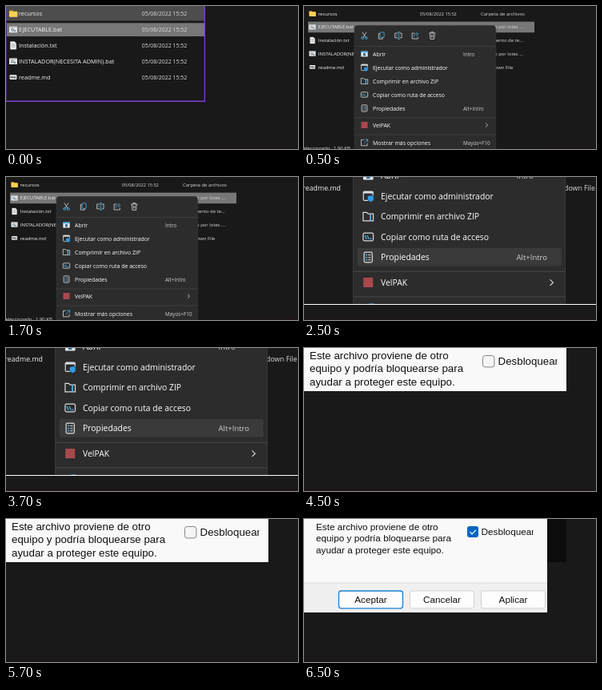
Write an HTML page that moves like this. It is 365 px wide and 179 px high and loops after 8000 ms.

```html
<!DOCTYPE html>
<html lang="es">
<head>
<meta charset="utf-8">
<title>Desbloquear archivo</title>
<style>
html, body { margin: 0; width: 100%; height: 100%; overflow: hidden; background: #191919; }
svg { display: block; width: 100vw; height: 100vh; }
text { font-family: "Open Sans", "Noto Sans", sans-serif; white-space: pre; }
.dialog text { font-family: "Liberation Sans", Arial, sans-serif; }
</style>
</head>
<body>
<svg id="stage" viewBox="0 0 365 179"></svg>
<script>
const LOOP = 8000;
const STARTS = [0, 500, 2500, 4500, 6500];

const rect = (x, y, w, h, fill, extra = '') =>
  `<rect x="${x}" y="${y}" width="${w}" height="${h}" fill="${fill}" ${extra}/>`;
const line = (d, stroke, width = 0.8, fill = 'none') =>
  `<path d="${d}" stroke="${stroke}" stroke-width="${width}" fill="${fill}"/>`;
const text = (x, y, size, str, fill = '#f2f2f2', extra = '') =>
  `<text x="${x}" y="${y}" font-size="${size}" fill="${fill}" ${extra}>${str}</text>`;
const at = (x, y, body, scale = 1) =>
  `<g transform="translate(${x} ${y}) scale(${scale})">${body}</g>`;

// Icons are centred on 0,0.
const fileIcons = {
  folder: rect(-5, -4, 5, 4, '#e0a020', 'rx=".8"') + rect(-5, -2.8, 10.4, 7, '#ffcf55', 'rx=".8"'),
  bat: rect(-5, -3.8, 10, 7.6, '#e8eaec', 'rx=".6"') + rect(-5, -3.8, 10, 1.4, '#b9c0c6') +
    '<circle cx="-1" cy=".2" r="1.5" fill="none" stroke="#66737d"/>' +
    '<circle cx="2" cy="1.6" r="1" fill="none" stroke="#66737d" stroke-width=".8"/>',
  txt: line('M-3.6-4.8H1.6L3.8-2.6V4.8H-3.6Z', '#b8b8b8', 0.5, '#f4f4f4') +
    line('M-2.2-1.8H2.4M-2.2 0H2.4M-2.2 1.8H2.4', '#85909a', 0.7),
  md: rect(-4.4, -2.9, 8.8, 5.8, '#f0f0f0', 'rx="1"') +
    line('M-2.8 1.4V-1.2L-1.5.3-.2-1.2V1.4M2-1.4V.9M.9.1L2 1.3 3.1.1', '#222', 0.9)
};

const files = [
  ['folder', 'recursos', 'Carpeta de archivos'],
  ['bat', 'EJECUTABLE.bat', 'Archivo por lotes ...'],
  ['txt', 'Instalación.txt', 'Documento de te...'],
  ['bat', 'INSTALADOR(NECESITA ADMIN).bat', 'Archivo por lotes ...'],
  ['md', 'readme.md', 'Markdown File']
];
const DATE = '05/08/2022 15:52';

function fileList(o) {
  return files.map(([icon, name, type], i) => {
    const y = o.y + i * o.step, base = y + o.size * 0.36;
    return at(o.icon, y, fileIcons[icon], o.size / 7.3) +
      text(o.name, base, o.size, name) +
      text(o.date, base, o.size * 0.955, DATE, '#dcdcdc') +
      (o.type ? text(o.type, base, o.size, type, '#dcdcdc') : '');
  }).join('');
}

const BLUE = '#4cb4ee', PALE = '#d8dde0';
const toolIcons = [
  line('M-2.6-4.4L1.6 2M2.6-4.4L-1.6 2', PALE) +
    '<g fill="none" stroke="#4cb4ee" stroke-width=".9"><circle cx="-2.3" cy="3" r="1.4"/><circle cx="2.3" cy="3" r="1.4"/></g>',
  rect(-1.6, -4.2, 5, 6.6, 'none', `rx="1" stroke="${BLUE}" stroke-width=".8"`) +
    line('M-1.8-2.6H-3.4V4.2H1.6V2.6', PALE),
  line('M-.6-3H-4.2V2.8H-.6M2-3H4.2V2.8H2', PALE) + line('M-.6-4.4H2M.7-4.4V4.4M-.6 4.4H2M-2.8 0H-.8', BLUE),
  line('M-.6-3H-4V4H3.2V1.6', PALE) + line('M-2 1.6C-1.6-1.2 0-1.8 2-1.8M1-4L4-1.6 1 .8', BLUE),
  line('M-4-3H4M-1.4-3V-4.4H1.4V-3M-3-3L-2.3 4.4H2.3L3-3M-.9-1V2.4M.9-1V2.4', PALE)
];

const menuRows = [
  [60, 'Abrir', 'Intro',
    rect(-4.2, -3.4, 8.4, 6.8, '#e6eaed', 'rx=".5"') + rect(-4.2, -3.4, 8.4, 1.5, '#2f9be0') + rect(-1.5, -1, 3, 3.4, '#2b6fa8')],
  [77, 'Ejecutar como administrador', '',
    rect(-4, -4, 8, 7.6, 'none', `rx="1" stroke="${PALE}" stroke-width=".8"`) + rect(-4, -4, 8, 1.7, PALE) +
    line('M2-.8L4.6 0V2.2C4.6 3.6 3.2 4.4 2 5 .8 4.4-.6 3.6-.6 2.2V0Z', '#2c2c2c', 0.4, '#2d9de8')],
  [94, 'Comprimir en archivo ZIP', '',
    line('M-4.2 3.6V-3.4H-1.2L0-2.2H4.2V3.6Z', PALE) + line('M1.8-2V3.4', BLUE, 1.2)],
  [111, 'Copiar como ruta de acceso', '',
    rect(-4.2, -3.2, 8.4, 6.4, 'none', `rx="1" stroke="${PALE}" stroke-width=".8"`) +
    line('M-2.8-1.4L-1.4 1.8M-.8-1.4L.6 1.8', BLUE) + rect(1.4, 1, 1.4, 0.9, BLUE)],
  [128, 'Propiedades', 'Alt+Intro',
    rect(-3.4, -4.2, 6.8, 8.4, 'none', `rx="1" stroke="${PALE}" stroke-width=".8"`) +
    line('M-2-2H-.8M-2 .1H-.8M-2 2.2H-.8', BLUE, 1) + line('M0-2H2.1M0 .1H2.1M0 2.2H2.1', PALE, 0.7)],
  [149, 'VelPAK', '', rect(-4, -4, 8, 8, '#a8484c')],
  [171, 'Mostrar más opciones', 'Mayús+F10',
    line('M-.8-3.6H-4V3.8H3.6V.8', PALE) + line('M.8-4H4.2V-.6M4.2-4L-.6.8', BLUE)]
];

function menu(active) {
  const rule = y => rect(63, y, 177, 0.7, '#454545');
  return rect(63, 24.3, 176.7, 170, '#2c2c2c', 'rx="4" stroke="#3c3c3c" stroke-width=".6"') +
    toolIcons.map((icon, i) => at(75.5 + i * 21.2, 37, icon)).join('') +
    rule(50) + rule(139.6) + rule(160.6) +
    (active ? rect(66.5, 120.3, 170, 15, '#3a3a3a', 'rx="2"') : '') +
    menuRows.map(([y, label, key, icon]) =>
      at(75.5, y, icon) + text(86, y + 2.5, 6.95, label, '#fff') +
      text(199, y + 2.5, 6.35, key, '#cfcfcf')).join('') +
    line('M227 146.6L229.6 149.1 227 151.6', '#d8d8d8');
}

const NOTE = ['Este archivo proviene de otro', 'equipo y podría bloquearse para', 'ayudar a proteger este equipo.'];
const note = (x, y, step, size) => NOTE.map((s, i) => text(x, y + i * step, size, s, '#111')).join('');

// Label cut off at the right by its own box.
const clipped = (x, y, w, size) =>
  `<svg x="${x}" y="0" width="${w}" height="54">${text(0, y, size, 'Desbloquear', '#111')}</svg>`;

const button = (x, w, label, stroke, width) =>
  rect(x + 0.5, 90, w - 1, 21.8, '#fdfdfd', `rx="3" stroke="${stroke}" stroke-width="${width}"`) +
  text(x + w / 2, 105, 11.74, label, '#111', 'text-anchor="middle"');

const scenes = [
  rect(0, 0, 249, 120, '#191919') + rect(0, 0, 248, 18.5, '#4d4d4d') +
    rect(1, 21.3, 247, 16.7, '#777') +
    fileList({ y: 9.6, step: 19.9, size: 7.3, icon: 9, name: 16, date: 169.7 }) +
    rect(0, 0, 0.6, 119, '#7038b8') + rect(247.8, 0, 1.2, 120, '#8340d6') + rect(0, 118.5, 249, 1.5, '#8340d6'),

  rect(0, 0, 288, 179, '#191919') + rect(5, 19.6, 283, 13.6, '#777') +
    fileList({ y: 9.6, step: 16.7, size: 5.95, icon: 10.5, name: 17.8, date: 144.8, type: 221 }) +
    text(-0.5, 180, 5.95, 'eleccionado', '#e0e0e0') + text(37, 180, 5.95, '1.90 KB', '#e0e0e0') +
    menu(false),

  rect(0, 0, 365, 160, '#191919') +
    text(46, 17, 8.8, 'readme.md', '#f2f2f2', 'text-anchor="end"') +
    text(364, 17, 8.8, 'Markdown File', '#dcdcdc', 'text-anchor="end"') +
    `<svg width="365" height="159">${at(-33, -91.5, menu(true), 1.5)}</svg>` +
    rect(0, 159, 365, 1, '#fff'),

  rect(0, 0, 328, 54, '#f9f9f9') + note(7, 14, 16.3, 13.35) +
    rect(223.5, 9.5, 14.4, 14.4, '#f5f5f5', 'rx="3" stroke="#868686"') + clipped(242.6, 21.3, 73.8, 13.3),

  rect(304, 0, 24, 54, '#0c0c0c') + rect(0, 0, 304, 117, '#f9f9f9') +
    rect(0, 80, 304, 37, '#f0f0f0') + rect(0, 79.5, 304, 1, '#dfdfdf') +
    note(15, 13.8, 14.5, 11.74) +
    rect(204, 9, 14, 14, '#0067c0', 'rx="3"') + line('M207.4 16.2L210 18.8 214.7 13.8', '#fff', 1.2) +
    clipped(221.6, 20.3, 65, 11.74) +
    button(43, 81, 'Aceptar', '#1a7fd0', 1.3) + button(132, 81, 'Cancelar', '#d0d0d0', 1) +
    button(221, 81, 'Aplicar', '#d0d0d0', 1)
];

const stage = document.getElementById('stage');
stage.innerHTML = rect(0, 0, 365, 179, '#191919') + rect(0, 174, 365, 5, '#1b1618') +
  scenes.map((s, i) => `<g class="scene${i > 2 ? ' dialog' : ''}">${s}</g>`).join('');
const groups = [...stage.querySelectorAll('.scene')];

function draw(time) {
  const t = time % LOOP;
  const current = STARTS.filter(s => s <= t).length - 1;
  groups.forEach((g, i) => { g.style.display = i === current ? '' : 'none'; });
}

function tick() {
  draw(performance.now());
  requestAnimationFrame(tick);
}
tick();
</script>
</body>
</html>
```
